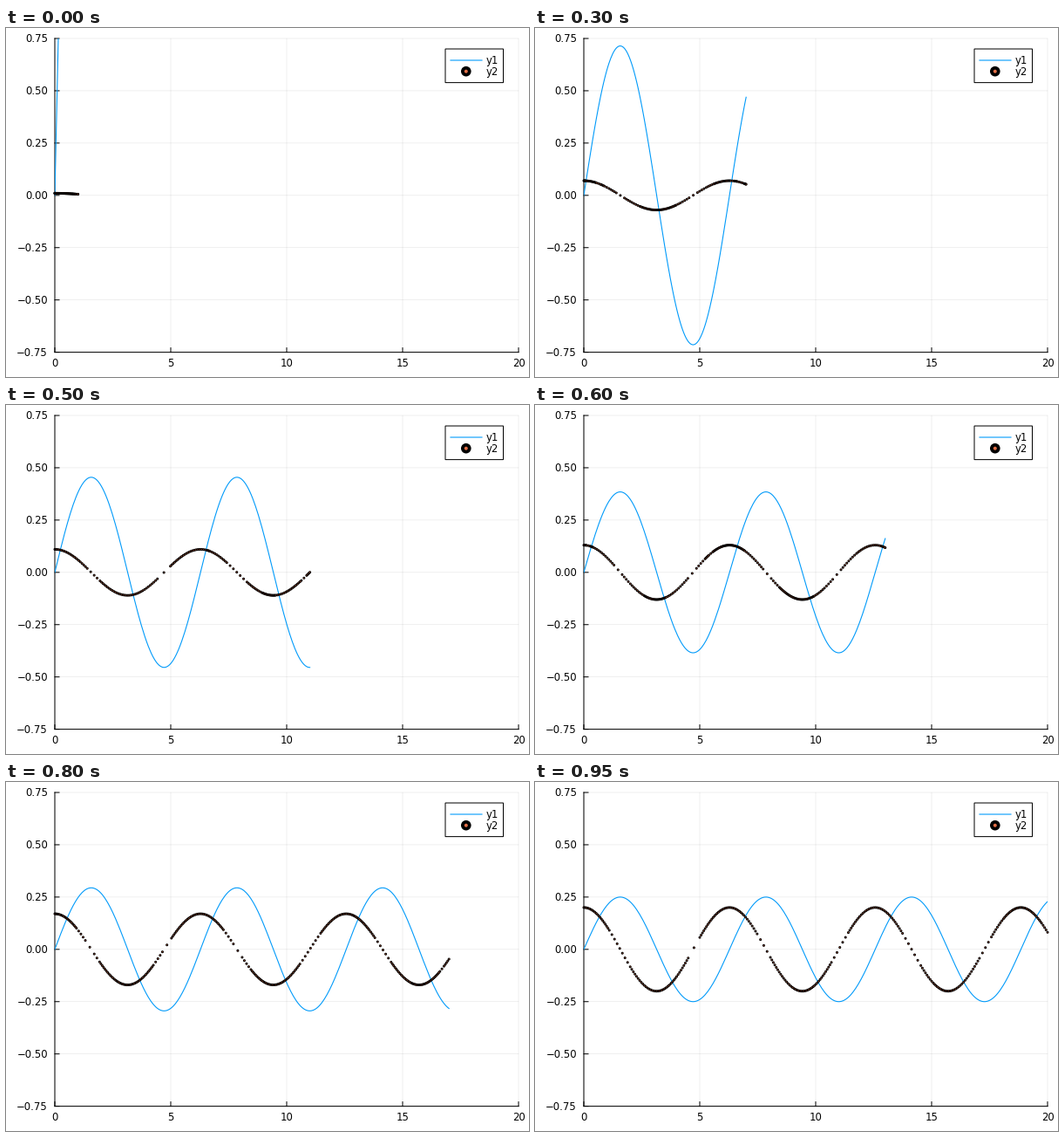
Recreate the animation shown at these times as a matplotlib script. Size 600x400 px, loop 1000 ms.

```python
import numpy as np
import matplotlib.pyplot as plt
from matplotlib.animation import FuncAnimation
from matplotlib.patches import Circle, Rectangle

W, H, DPI = 600, 400, 100
FRAMES = 20
LEFT, RIGHT, TOP, BOTTOM = 56, 588, 12, 371.6
X_MAX, Y_MAX = 20, 0.75
BLUE, ORANGE, INK = "#009AFA", "#E36F47", "#000000"
PX = 72 / DPI
FONT = dict(family="DejaVu Sans", size=11.6 * PX, color=INK)

# Fixed jitter applied to the interior nodes of the coarse grid.
JITTER = np.array([
    .226582, .504629, .933372, .522172, .505208, .0997825, .0443222,
    .722906, .812814, .245457, .11202, .000342, .380001, .505277,
    .841177, .326561, .810857, .850456, .478053]) - 0.5


def curvature(xs, fs, i):
    right = (fs[i + 1] - fs[i]) / (xs[i + 1] - xs[i])
    left = (fs[i] - fs[i - 1]) / (xs[i] - xs[i - 1])
    return abs(2 * (right - left) * (xs[i + 1] - xs[i - 1]))


def adaptive_grid(f, end, max_depth=7, tolerance=0.01):
    """Sample f on [0, end], halving the most curved intervals first."""
    xs = np.linspace(0, end, 21)
    xs[1] *= 0.25
    xs[-2] = end - (end - xs[-2]) * 0.25
    for i, jitter in enumerate(JITTER, 1):
        xs[i] += 0.1 * jitter * (xs[i + 1] - xs[i - 1])
    depth = [0] * 10

    while True:
        fs = f(xs)
        count = len(depth)
        spread = np.ptp(fs)
        bend = np.zeros(count)
        active = np.zeros(count, bool)
        for k in range(count):
            if depth[k] >= max_depth:
                continue
            total = 0
            for offset, weight in ((-1, 0.25), (0, 0.5), (1, 0.25)):
                i = 2 * k + 1 + offset
                if 0 < i < len(xs) - 1:
                    bend[k] += weight * curvature(xs, fs, i) / spread
                    total += weight
            bend[k] /= total
            active[k] = bend[k] > tolerance
        bend[0], active[0] = bend[1], active[1]
        bend[-1], active[-1] = bend[-2], active[-2]

        candidates = np.flatnonzero(active)
        if all(depth[k] >= max_depth for k in candidates):
            return xs, fs
        order = np.argsort(bend[candidates], kind="stable")
        chosen = set(candidates[order[-(count // 2):]])

        new_xs, new_depth = [xs[0]], []
        for k in range(count):
            a, b, c = xs[2 * k:2 * k + 3]
            if k in chosen:
                new_xs += [(a + b) / 2, b, (b + c) / 2, c]
                new_depth += [depth[k] + 1] * 2
            else:
                new_xs += [b, c]
                new_depth.append(depth[k])
        xs, depth = np.array(new_xs), new_depth


def to_px(x, y):
    return (LEFT + np.asarray(x) / X_MAX * (RIGHT - LEFT),
            (TOP + BOTTOM) / 2 - np.asarray(y) / Y_MAX * (BOTTOM - TOP) / 2)


fig = plt.figure(figsize=(W / DPI, H / DPI), dpi=DPI, facecolor="white")
ax = fig.add_axes([0, 0, 1, 1])
ax.set(xlim=(0, W), ylim=(H, 0))
ax.axis("off")


def stroke(x, y, color=INK, width=1.0, **style):
    return ax.plot(x, y, color=color, lw=width * PX, snap=False, **style)[0]


def label(x, y, text, ha):
    ax.text(x, y, text, ha=ha, va="baseline", zorder=6, **FONT)


for value in range(0, 21, 5):
    x, _ = to_px(value, 0)
    stroke([x, x], [TOP, BOTTOM], alpha=0.1, width=0.6, zorder=1)
    stroke([x, x], [BOTTOM, BOTTOM - 5], zorder=2)
    label(x, 387.5, str(value), "center")
for step in range(-3, 4):
    _, y = to_px(0, step / 4)
    stroke([LEFT, RIGHT], [y, y], alpha=0.1, width=0.6, zorder=1)
    stroke([LEFT, LEFT + 5], [y, y], zorder=2)
    label(48, y + 4.3, f"{step / 4:.2f}".replace("-", "\u2212"), "right")
stroke([LEFT, LEFT, RIGHT], [TOP, BOTTOM, BOTTOM], zorder=2)

wave = stroke([], [], BLUE, 1.1, zorder=3)
plot_area = Rectangle((LEFT, TOP), RIGHT - LEFT, BOTTOM - TOP,
                      transform=ax.transData)
wave.set_clip_path(plot_area)
dots = ax.scatter([], [], s=(2.0 * PX) ** 2, edgecolors=INK,
                  linewidths=1.0 * PX, zorder=4)
dots.set_snap(False)
# Two equal face colours keep the dots at sub-pixel positions.
dots.set_facecolor([ORANGE, ORANGE])

ax.add_patch(Rectangle((504, 24), 66.5, 38.6, fc="white", ec=INK,
                       lw=PX, zorder=5, snap=False))
stroke([510, 546], [37, 37], BLUE, 1.1, zorder=6)
ax.add_patch(Circle((527.8, 49.7), 5.8, fc=INK, lw=0, zorder=6))
ax.add_patch(Circle((527.8, 49.7), 2.0, fc=ORANGE, lw=0, zorder=7))
label(551, 41.2, "y1", "left")
label(551, 54.2, "y2", "left")


def update(frame):
    n = frame + 1
    wave.set_data(*to_px(*adaptive_grid(lambda x: 5 / n * np.sin(x), n)))
    points = adaptive_grid(lambda x: n / 100 * np.cos(x), n)
    dots.set_offsets(np.column_stack(to_px(*points)))
    return wave, dots


anim = FuncAnimation(fig, update, frames=FRAMES, interval=50,
                     repeat=True, repeat_delay=0, blit=False)
plt.show()
```
